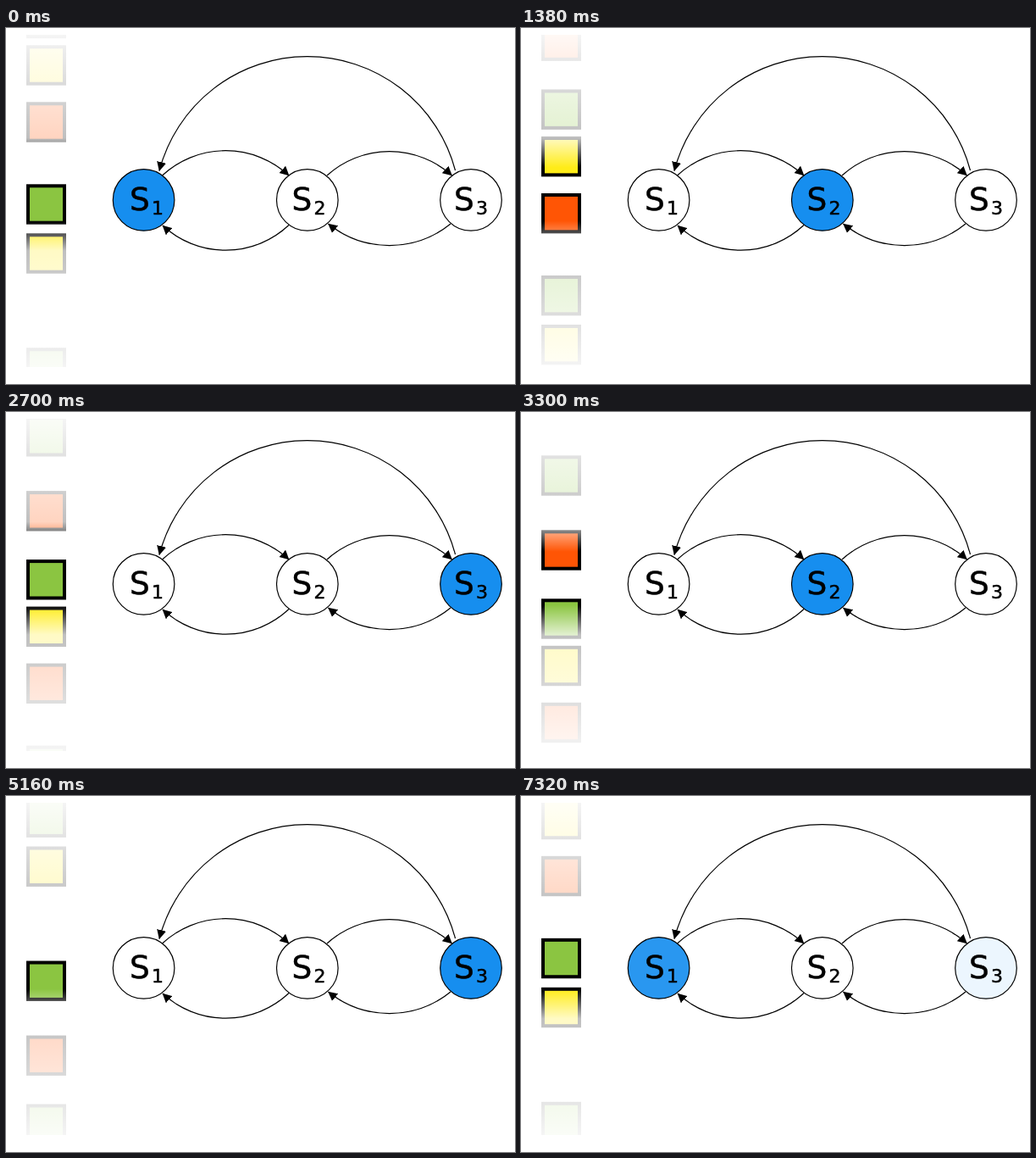
These frames come from a looping animation (601 px wide and 420 px high, 7380 ms). An HTML page:

```html
<!DOCTYPE html>
<html lang="en">
<head>
<meta charset="utf-8">
<title>State machine</title>
<style>
  html, body { margin: 0; width: 100%; height: 100%; overflow: hidden; background: #fff; }
  svg { display: block; width: 601px; height: 420px; }
  text { font-family: "DejaVu Sans", Verdana, sans-serif; stroke: #000; stroke-width: .5; }
  .arc { fill: none; stroke: #000; stroke-width: 1.2; marker-end: url(#arrow); }
</style>
</head>
<body>
<svg viewBox="0 0 601 420">
  <defs>
    <!-- White veil: clear at the reading position, dense towards both ends. -->
    <linearGradient id="veil" gradientUnits="userSpaceOnUse" x1="0" y1="8" x2="0" y2="400">
      <stop offset="0" stop-color="#fff" stop-opacity=".96"/>
      <stop offset=".31" stop-color="#fff" stop-opacity=".75"/>
      <stop offset=".4" stop-color="#fff" stop-opacity="0"/>
      <stop offset=".56" stop-color="#fff" stop-opacity="0"/>
      <stop offset=".65" stop-color="#fff" stop-opacity=".75"/>
      <stop offset="1" stop-color="#fff" stop-opacity=".96"/>
    </linearGradient>
    <clipPath id="window"><rect x="20" y="8" width="55" height="392"/></clipPath>
    <marker id="arrow" markerUnits="userSpaceOnUse" markerWidth="12" markerHeight="12"
            refX="10.5" refY="6" orient="auto">
      <path d="M0 .4L11 6L0 11.6Z"/>
    </marker>
  </defs>
  <g clip-path="url(#window)">
    <g id="tape" stroke="#000" stroke-width="4"></g>
    <rect x="20" width="55" height="420" fill="url(#veil)"/>
  </g>
  <g id="states"></g>
  <path class="arc" d="M184.5 174A110 110 0 0 1 334 174"/>
  <path class="arc" d="M379 174A110 110 0 0 1 526.5 174"/>
  <path class="arc" d="M334 232.5A109 109 0 0 1 185 233"/>
  <path class="arc" d="M525 231A115 115 0 0 1 380.5 231"/>
  <path class="arc" d="M530.5 168A180.75 180.75 0 0 0 181 168.5"/>
</svg>
<script>
const STEP = 60, STEPS = 123;
const TAPE_LENGTH = 581.5, SPEED = 4.62, LEAD = 1.4;
const CELL = 43.4, FADE_TIME = 480;
const COLOURS = { G: '#8bc541', Y: '#ffec18', R: '#ff5505' };
const BLUE = [22, 142, 239];

// Symbols on the tape and the distance from each to the next.
const symbols = [...'YRGYGRG'];
const gaps = [67, 97, 58, 135, 88, 81];
// States in the order visited, and when each fade to the next one starts.
const visits = [0, 1, 2, 1, 2, 0];
const fadeStarts = [80, 1980, 2700, 4620, 6880];

function add(parent, tag, attrs, text = '') {
  const el = document.createElementNS('http://www.w3.org/2000/svg', tag);
  for (const name in attrs) el.setAttribute(name, attrs[name]);
  el.textContent = text;
  return parent.appendChild(el);
}

const tape = document.getElementById('tape');
let nextY = 44;
const cells = symbols.map((symbol, i) => {
  const start = nextY;
  nextY += gaps[i];
  return { start, box: add(tape, 'rect', { x: 26, width: 43, height: CELL, fill: COLOURS[symbol] }) };
});

const group = document.getElementById('states');
const discs = [0, 1, 2].map(i => {
  const cx = 162.6 + 193.2 * i, x = 145.9 + 191.5 * i;
  const disc = add(group, 'circle', { cx, cy: 202.9, r: 36.3, stroke: '#000', 'stroke-width': 1.2 });
  add(group, 'text', { x, y: 215, 'font-size': 37.5 }, 'S');
  add(group, 'text', { x: x + 26.2, y: 220, 'font-size': 22 }, i + 1);
  return disc;
});

const clamp01 = v => Math.min(1, Math.max(0, v));
const tint = level => `rgb(${BLUE.map(c => Math.round(255 + (c - 255) * level))})`;

function render(ms) {
  const step = Math.floor(ms / STEP) % STEPS;
  const shift = step && LEAD + SPEED * step;
  for (const { start, box } of cells) {
    const y = (start + shift + 90) % TAPE_LENGTH - 90;
    box.setAttribute('y', y - CELL / 2);
  }

  const levels = [1, 0, 0];
  fadeStarts.forEach((start, i) => {
    const k = clamp01((step * STEP - start) / FADE_TIME);
    if (k > 0) {
      levels[visits[i]] = 1 - k;
      levels[visits[i + 1]] = k;
    }
  });
  discs.forEach((disc, i) => disc.setAttribute('fill', tint(levels[i])));
}

const begin = performance.now();
function tick() {
  render(performance.now() - begin);
  requestAnimationFrame(tick);
}
tick();
</script>
</body>
</html>
```
